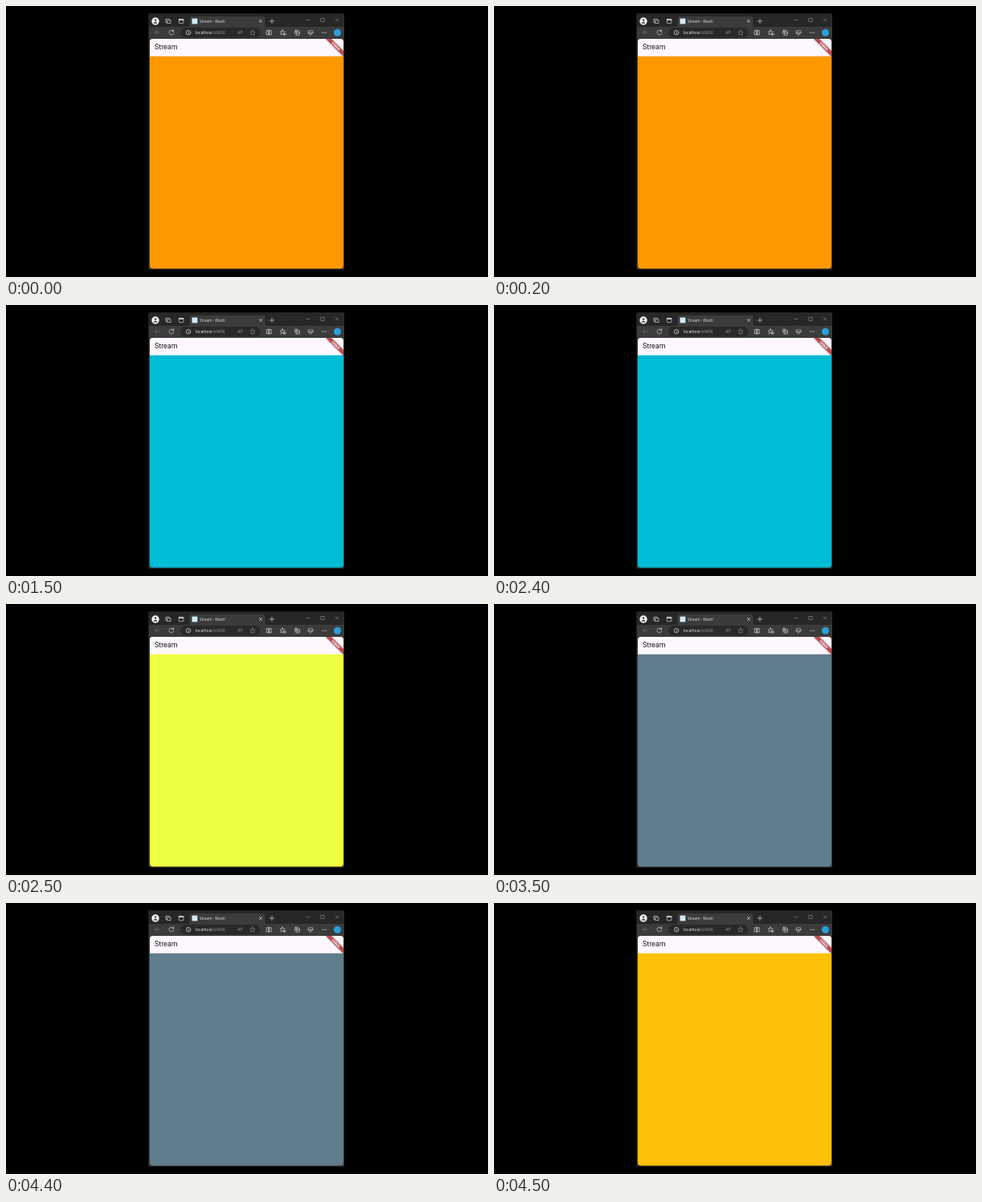
These frames come from a looping animation (600 by 338 pixels, 4900 ms). An HTML page:

```html
<!DOCTYPE html>
<html lang="en">
<head>
<meta charset="utf-8">
<title>Stream</title>
<style>
  html, body { margin: 0; width: 100%; height: 100%; overflow: hidden; background: #000; }
  svg { display: block; width: 100%; height: 100%; }
  text { font-family: "Open Sans", sans-serif; }
  .roboto { font-family: Roboto, sans-serif; }
  .icon { fill: none; stroke: #d2d2d2; stroke-width: .7; stroke-linecap: round; stroke-linejoin: round; }
  .dim { stroke: #858585; }
</style>
</head>
<body>
<svg viewBox="0 0 600 338">
  <defs>
    <clipPath id="page"><rect x="179" y="41" width="241" height="286.5" rx="4"/></clipPath>
    <filter id="shade" x="-30%" y="-100%" width="160%" height="300%"><feGaussianBlur stdDeviation="1.3"/></filter>
    <path id="star" d="M0-3.2 1-1 3.2-.8 1.5.7 2 3 0 1.8-2 3-1.5.7-3.2-.8-1-1Z"/>
    <path id="cross" d="M-1.6-1.6 1.6 1.6M1.6-1.6-1.6 1.6"/>
  </defs>

  <!-- window, tab and address bar -->
  <rect x="177.5" y="9.5" width="243.5" height="319" fill="#3b3b3b"/>
  <rect x="178" y="10" width="242.5" height="16" fill="#272727"/>
  <path d="M226 26q2.5 0 2.5-2.5V15.500q0-2.500 2.500-2.500h89q2.500 0 2.500 2.500v8q0 2.500 2.500 2.500Z" fill="#3b3b3b"/>
  <rect x="217" y="27" width="99.500" height="12.300" rx="6.100" fill="#292929"/>

  <circle cx="186" cy="19" r="4.700" fill="#f4f4f4"/>
  <g fill="#4a4a4a"><circle cx="186" cy="17.600" r="1.300"/><path d="M183.600 21.700q0-2 2.400-2t2.400 2Z"/></g>
  <rect x="231.500" y="15.600" width="6.800" height="6.800" fill="#d3ecf7"/>
  <text x="241" y="20.900" font-size="4.600" fill="#e4e4e4">Stream - Wadri</text>
  <text x="235.700" y="35" font-size="5.050" fill="#f0f0f0">localhost<tspan fill="#949494">:64808</tspan></text>
  <text x="288.300" y="35.400" font-size="5.800" fill="#a2a2a2">A</text>
  <path class="icon dim" d="M292.500 31.200q1.200.8 0 2M293.600 30.500q1.700 1.200 0 3"/>

  <g class="icon">
    <path d="M199 17.500v-1.200h4.500v1M199 17.500v3h1.500M201 18h4v3.500h-4Z"/>
    <rect x="215.300" y="16.300" width="5.600" height="5.400" rx=".8"/>
    <path d="M215.500 17.200h5.200" stroke-width="1.500"/>
    <use href="#cross" x="317" y="19"/>
    <path d="M328.200 19h5.600M331 16.200v5.600"/>
    <g class="dim">
      <path d="M374.300 17.500h4"/>
      <rect x="392.300" y="15.500" width="4" height="4"/>
      <use href="#cross" x="412" y="17.500"/>
    </g>
    <path stroke="#707070" d="M191.300 33h-6M187.800 30.500 185.300 33l2.500 2.500"/>
    <path d="M208.300 31.300a2.900 2.900 0 1 0 .5 2M208.600 29.700v1.900h-1.900"/>
    <circle cx="227" cy="33.200" r="2.800"/>
    <path d="M227 33v1.600M227 31.700v.1"/>
    <use href="#star" class="dim" x="307" y="33.200"/>
    <path d="M326.600 30.700h-2.300v5h2.300ZM328 30.700h2.300v5H328ZM327.300 30v6.400"/>
    <use href="#star" x="344.200" y="33"/>
    <path d="M345.800 34.500h2.400M345.800 36h2.400"/>
    <rect x="359.500" y="30.300" width="4.400" height="4.400" rx=".8"/>
    <path d="M361 36.300h3.300q1.200 0 1.200-1.200v-3M361.700 31.400v2.200M360.600 32.500h2.200"/>
    <path d="M376.400 33.500q-1.200-3 1.200-3 1.100 0 1.500 1 .6-1 1.700-1 2.200.3 1 3l-2.800 2.700ZM376 33.600h2l.8-1 1 2 .6-1h1.900"/>
  </g>
  <g fill="#d2d2d2"><circle cx="394" cy="33.200" r=".6"/><circle cx="396.200" cy="33.200" r=".6"/><circle cx="398.400" cy="33.200" r=".6"/></g>
  <circle cx="412.500" cy="33.200" r="4.500" fill="#2b9fd6"/>

  <!-- page -->
  <g clip-path="url(#page)">
    <rect id="body" x="179" y="41" width="241" height="287" fill="#ff9800"/>
    <rect x="179" y="41" width="241" height="21.700" fill="#fef7ff"/>
    <text class="roboto" x="185" y="54.400" font-size="8.900" fill="#1d1b20">Stream</text>
    <g transform="translate(420 41) rotate(45)">
      <rect x="-15.400" y="10.800" width="30.800" height="4.600" opacity=".5" filter="url(#shade)"/>
      <rect x="-15.400" y="10.800" width="30.800" height="4.600" fill="#bd4a4e"/>
      <text class="roboto" y="14.500" font-size="3.900" font-weight="900" text-anchor="middle" fill="#fff">DEBUG</text>
    </g>
  </g>
</svg>
<script>
  const LOOP = 4900, PERIOD = 1000, FIRST = 500;
  const colors = ["#ff9800", "#3f51b5", "#00bcd4", "#eeff41", "#607d8b", "#ffc107"];
  const body = document.getElementById("body");
  const start = performance.now();

  function draw(now) {
    const t = Math.max(0, now - start) % LOOP;
    body.setAttribute("fill", colors[Math.floor((t + PERIOD - FIRST) / PERIOD)]);
    requestAnimationFrame(draw);
  }
  draw(start);
</script>
</body>
</html>
```
